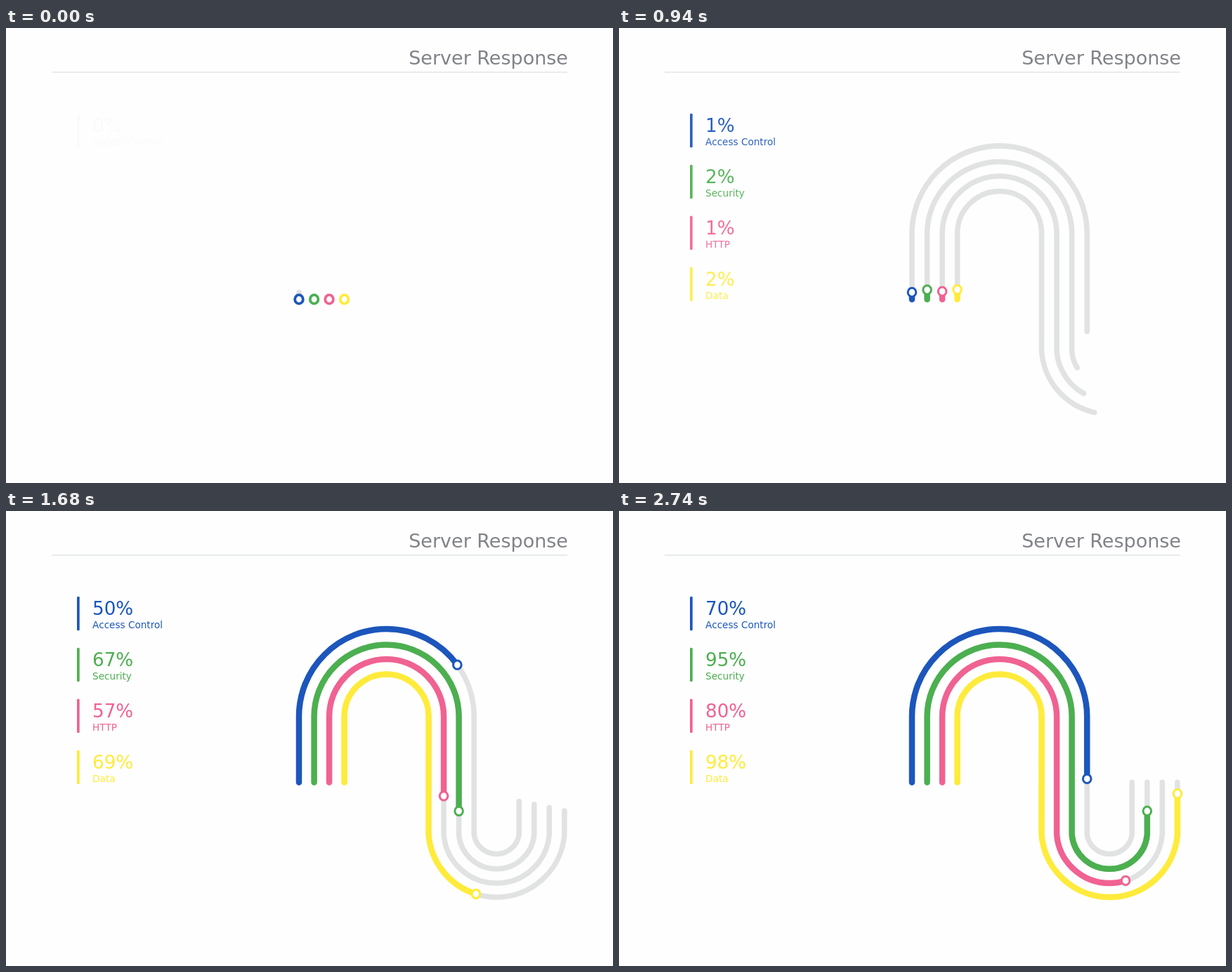
An HTML page for the animation above (6840 ms loop, 864 px wide and 648 px high).

```html
<!DOCTYPE html>
<html lang="en">
<head>
<meta charset="utf-8">
<title>Server Response</title>
<style>
  html, body { margin: 0; width: 100%; height: 100%; overflow: hidden; background: #fefefe; }
  svg { display: block; width: 864px; height: 648px; font-family: "DejaVu Sans", sans-serif; }
  path { fill: none; stroke-linecap: round; }
  .title { font-size: 27px; fill: #808388; text-anchor: end; }
  .value { font-size: 26.2px; }
  .label { font-size: 13.6px; }
  .track { stroke: #e1e3e3; stroke-width: 7.6; }
  .fill { stroke-width: 8.5; }
  .marker { fill: #fefefe; }
</style>
</head>
<body>
<svg viewBox="0 0 864 648">
  <text class="title" x="800" y="52.4">Server Response</text>
  <rect x="65" y="62.2" width="734" height="1.4" fill="#e0e4e6"/>
  <g id="legend"></g>
  <g id="tracks"></g>
  <g id="fills"></g>
  <g id="markers"></g>
</svg>
<script>
const LOOP = 6840, MOTION_END = 2740, DURATION = 2500;
const START_Y = 386.4, ARCH_Y = 292.5, BOWL_Y = 461;
const ARCH_X = 541.6, BOWL_X = 698.2;

const series = [
  { label: "Access Control", color: "#1c56bc", value: 70, rx: 124.6, ry: 124.6, bowl: 32,   depth: 27.5 },
  { label: "Security",       color: "#4caf50", value: 95, rx: 103,   ry: 102,   bowl: 53.6, depth: 48.8 },
  { label: "HTTP",           color: "#f06292", value: 80, rx: 81.5,  ry: 81.5,  bowl: 75.1, depth: 69 },
  { label: "Data",           color: "#ffeb3b", value: 98, rx: 60,    ry: 60,    bowl: 96.7, depth: 89 }
];

const clamp = x => Math.min(1, Math.max(0, x));
const cubicOut = x => 1 - (1 - clamp(x)) ** 3;
const quintInOut = x => {
  x = clamp(x);
  return x < 0.5 ? 16 * x ** 5 : 1 - 16 * (1 - x) ** 5;
};

function add(parent, tag, attrs, text = "") {
  const node = document.createElementNS("http://www.w3.org/2000/svg", tag);
  for (const key in attrs) node.setAttribute(key, attrs[key]);
  node.textContent = text;
  parent.appendChild(node);
  return node;
}

function curve({ rx, ry, bowl, depth }) {
  const radius = (bowl * bowl + depth * depth) / (2 * depth);
  return `M${ARCH_X - rx} ${START_Y}V${ARCH_Y}` +
    `A${rx} ${ry} 0 0 1 ${ARCH_X + rx} ${ARCH_Y}` +
    `L${BOWL_X - bowl} ${BOWL_Y}` +
    `A${radius} ${radius} 0 0 0 ${BOWL_X + bowl} ${BOWL_Y}V${START_Y}`;
}

const layer = id => document.getElementById(id);

series.forEach((s, i) => {
  const d = curve(s);
  s.delay = -10 + 39 * i;
  s.row = add(layer("legend"), "g", { transform: `translate(0 ${72.9 * i})`, fill: s.color });
  add(s.row, "rect", { x: 101, y: 121.8, width: 3.7, height: 48.4, rx: 1.5 });
  s.number = add(s.row, "text", { class: "value", x: 123, y: 148 });
  add(s.row, "text", { class: "label", x: 123.1, y: 167 }, s.label);
  s.track = add(layer("tracks"), "path", { class: "track", d });
  s.fill = add(layer("fills"), "path", { class: "fill", d, stroke: s.color });
  s.marker = add(layer("markers"), "ellipse", { class: "marker", rx: 5.8, ry: 6.2, stroke: s.color });
  s.length = s.track.getTotalLength();
});

function reveal(path, drawn, length) {
  path.setAttribute("stroke-dasharray", `${drawn} ${length + 40}`);
}

function render(now) {
  const t = Math.min(now % LOOP, MOTION_END);
  const progress = quintInOut((t - 302) / DURATION);
  for (const s of series) {
    const percent = s.value * progress;
    const drawn = s.length * percent / 100;
    const tip = s.track.getPointAtLength(drawn);
    s.row.setAttribute("opacity", cubicOut((t - s.delay) / 1600));
    s.number.textContent = Math.round(percent) + "%";
    reveal(s.track, s.length * cubicOut((t - s.delay) / DURATION), s.length);
    reveal(s.fill, drawn, s.length);
    s.marker.setAttribute("cx", tip.x);
    s.marker.setAttribute("cy", tip.y);
    s.marker.setAttribute("stroke-width", t < 20 ? 3.8 : 3);
  }
}

let origin;
function tick(now) {
  origin ??= now;
  render(now - origin);
  requestAnimationFrame(tick);
}
render(0);
requestAnimationFrame(tick);
</script>
</body>
</html>
```
